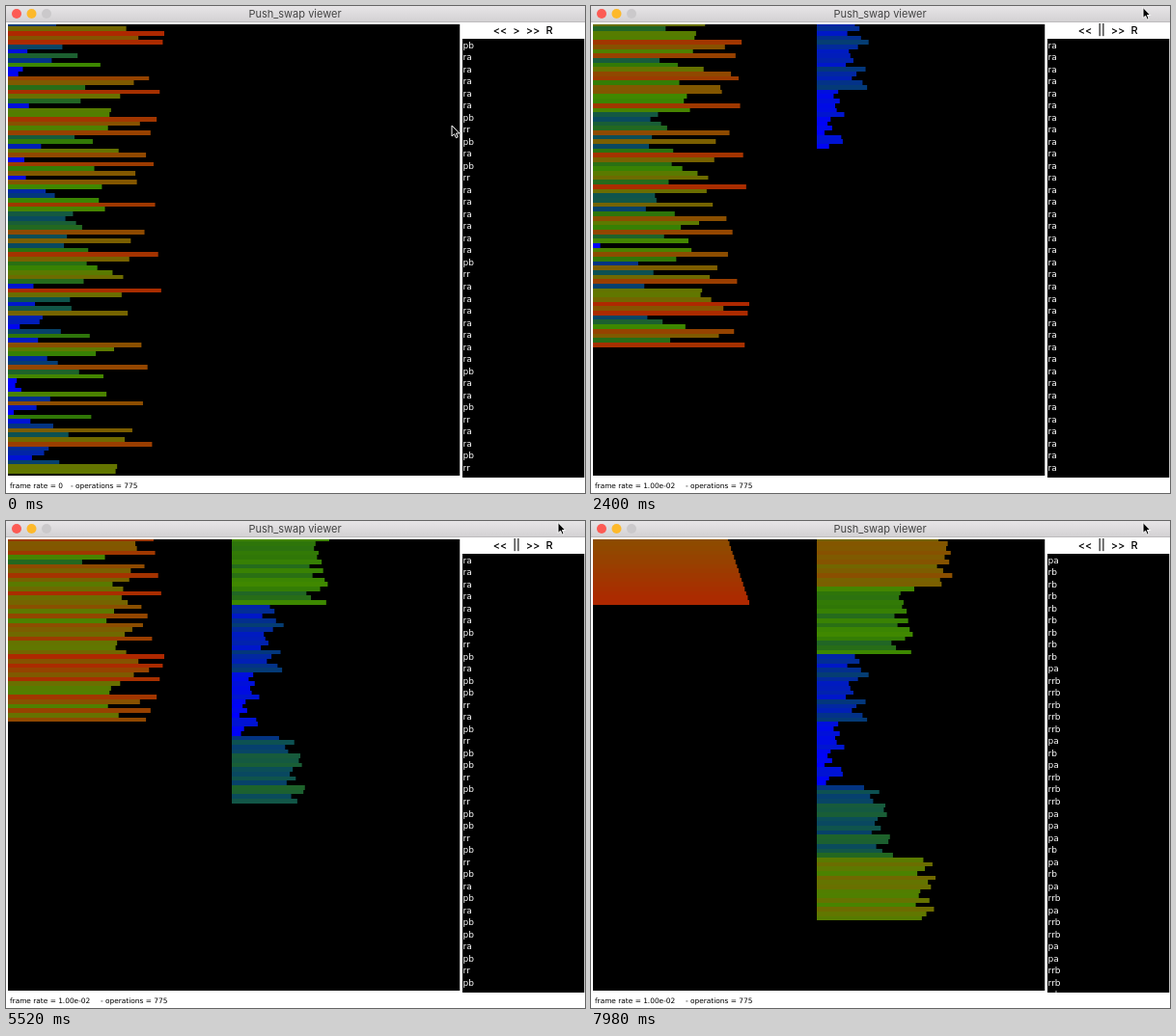
An HTML page with a canvas for the animation above (8 s loop, 600 by 505 pixels).

```html
<!DOCTYPE html>
<html>
<head>
<meta charset="utf-8">
<style>
html, body { margin: 0; height: 100%; overflow: hidden; background: #fff; }
canvas { display: block; }
</style>
</head>
<body>
<canvas id="stage" width="600" height="505"></canvas>
<script>
const ctx = document.getElementById('stage').getContext('2d');
const LOOP = 8000, STEP = 60, ROW = 4.68, TOP = 16.6, LINE = 12.51;

// Starting order of the ranks 0..99
const START = [
  28, 74, 99, 82, 98, 32, 9, 42, 25, 57, 6, 3, 89, 79, 47, 96, 70, 44, 10, 64,
  63, 94, 83, 62, 90, 40, 52, 18, 69, 87, 7, 92, 53, 80, 8, 81, 58, 21, 27, 56,
  93, 60, 39, 34, 41, 45, 86, 35, 77, 33, 49, 95, 76, 48, 55, 65, 72, 46, 13, 97,
  71, 37, 14, 38, 75, 19, 17, 4, 31, 50, 16, 84, 66, 54, 22, 29, 88, 43, 59, 2,
  1, 5, 61, 24, 85, 15, 0, 51, 11, 26, 78, 36, 73, 91, 23, 20, 12, 30, 68, 67
];

const rotate = s => { if (s.length) s.push(s.shift()); };
const OPS = {
  pa: (a, b) => a.unshift(b.shift()),
  pb: (a, b) => b.unshift(a.shift()),
  ra: a => rotate(a),
  rb: (a, b) => rotate(b),
  rr: (a, b) => { rotate(a); rotate(b); },
  rrb: (a, b) => b.unshift(b.pop())
};

// Push in chunks of 30 (lower half to the bottom of b), then pull back the maximum each time
function planSort() {
  const a = [...START], b = [], ops = [];
  const run = op => { OPS[op](a, b); ops.push(op); };
  let chunk = 1, pushed = 0;
  while (a.length) {
    const rank = a[0];
    if (rank >= 30 * chunk) { run('ra'); continue; }
    run('pb');
    if (++pushed === 30 * chunk) chunk++;
    if (rank < 30 * chunk - 16) run('rr');
  }
  while (b.length) {
    const at = b.indexOf(Math.max(...b)), up = at <= b.length / 2;
    for (let n = up ? at : b.length - at; n > 0; n--) run(up ? 'rb' : 'rrb');
    run('pa');
  }
  return ops;
}
const plan = planSort();

const COLORS = [
  [0, 0, 0, 255], [.15, 0, 24, 200], [.27, 3, 54, 125], [.36, 12, 80, 84],
  [.45, 34, 103, 34], [.51, 47, 118, 8], [.58, 62, 137, 0], [.68, 98, 118, 0],
  [.8, 127, 90, 0], [.9, 149, 67, 0], [1, 174, 40, 0]
];
function barColor(v) {
  const i = Math.max(1, COLORS.findIndex(c => c[0] >= v));
  const lo = COLORS[i - 1], hi = COLORS[i], f = (v - lo[0]) / (hi[0] - lo[0]);
  return `rgb(${[1, 2, 3].map(n => Math.round(lo[n] + (hi[n] - lo[n]) * f))})`;
}

function rect(x, y, w, h, color) {
  ctx.fillStyle = color;
  ctx.fillRect(x, y, w, h);
}
function text(str, x, y, font, color = '#000', align = 'left') {
  ctx.font = font;
  ctx.fillStyle = color;
  ctx.textAlign = align;
  ctx.fillText(str, x, y);
}
function clipped(x, y, w, h, draw) {
  ctx.save();
  ctx.beginPath();
  ctx.rect(x, y, w, h);
  ctx.clip();
  rect(x, y, w, h, '#000');
  draw();
  ctx.restore();
}

function drawStack(stack, x) {
  stack.forEach((rank, i) => {
    const y = Math.round(TOP + i * ROW), end = Math.round(TOP + (i + 1) * ROW);
    rect(x, y, 8 + rank * 156 / 99, end - y, barColor(rank / 99));
  });
}

function drawWindow(playing) {
  rect(0, 0, 600, 505, '#fff');
  const bar = ctx.createLinearGradient(0, 0, 0, 17);
  bar.addColorStop(0, '#e7e5e7');
  bar.addColorStop(1, '#d2d0d2');
  rect(0, 0, 600, 16, bar);
  rect(0, 16, 600, 1, '#bdbbbd');
  ['#fc5b54', '#fdb92b', '#cbc9cb'].forEach((color, i) => {
    ctx.fillStyle = color;
    ctx.beginPath();
    ctx.arc(11 + 15.5 * i, 8, 5, 0, 7);
    ctx.fill();
  });
  text('Push_swap viewer', 299.5, 12, '11px Inter, sans-serif', '#444', 'center');
  const labels = [['<<', 512], [playing ? '||' : '>', 529], ['>>', 546], ['R', 563]];
  for (const [label, x] of labels) text(label, x, 28.5, '500 11px Inter, sans-serif', '#000', 'center');
  const small = '7.4px "DejaVu Sans", sans-serif';
  text('frame rate = ' + (playing ? '1.00e-02' : '0'), 4, 499.5, small);
  text('- operations = 775', playing ? 98 : 67, 499.5, small);
}

function drawCursor(t) {
  const path = [[0, 462, 124], [420, 527, 23], [660, 527, 23], [840, 572, 1.5], [LOOP, 572, 1.5]];
  const i = path.findIndex(p => p[0] > t), from = path[i - 1], to = path[i];
  const f = (t - from[0]) / (to[0] - from[0]), ease = f * f * (3 - 2 * f);
  ctx.save();
  ctx.translate(from[1] + (to[1] - from[1]) * ease, from[2] + (to[2] - from[2]) * ease);
  ctx.fillStyle = '#000';
  ctx.strokeStyle = '#fff';
  ctx.lineWidth = 1;
  const arrow = new Path2D('M0 0V11L2.6 8.7L4.4 12.7L6.2 11.9L4.5 8H7.8Z');
  ctx.fill(arrow);
  ctx.stroke(arrow);
  ctx.restore();
}

function draw(t) {
  const done = Math.max(0, Math.floor(182.9 + (t - 3540) * .06195));
  const a = [...START], b = [];
  for (const op of plan.slice(0, done)) OPS[op](a, b);

  drawWindow(done > 0);
  clipped(2, 19, 468.5, 468, () => {
    drawStack(a, 0);
    drawStack(b, 234);
  });
  clipped(473, 34, 126.5, 455, () => {
    const first = Math.max(0, done - 1);
    plan.slice(first, first + 37).forEach((op, i) =>
      text(op, 473.6, 43.8 + i * LINE, '9px "DejaVu Sans", sans-serif', '#fff'));
  });
  drawCursor(t);
}

function tick() {
  const t = performance.now() % LOOP;
  draw(Math.floor(t / STEP) * STEP);
  requestAnimationFrame(tick);
}
tick();
</script>
</body>
</html>
```
